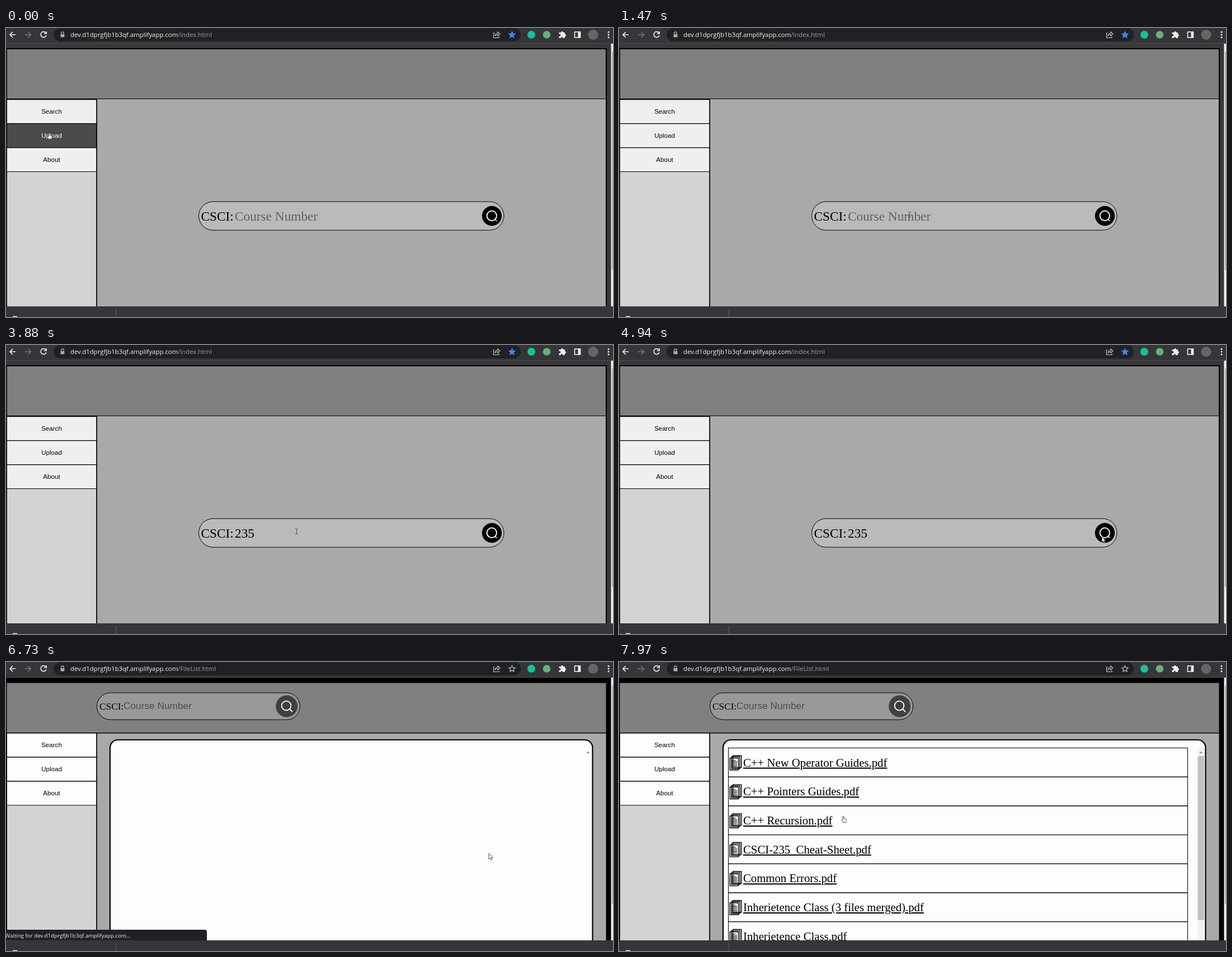
An HTML page for the animation above (8000 ms loop, 1085x516 px).

```html
<!DOCTYPE html>
<html lang="en">
<head>
<meta charset="utf-8">
<title>Course file search</title>
<style>
  html, body { margin: 0; width: 100%; height: 100%; overflow: hidden; background: #35363a; }
  svg { display: block; width: 100%; height: 100%; }
  .ui { font-family: "Open Sans", "Noto Sans", sans-serif; }
  .sans { font-family: "Liberation Sans", Arial, sans-serif; }
  .serif { font-family: "Liberation Serif", "Times New Roman", serif; }
  .line { fill: none; stroke: #f1f1f1; stroke-width: 1.6; }
  text { white-space: pre; }
</style>
</head>
<body>
<svg viewBox="0 0 1085 516">
  <defs>
    <g id="arrow"><path d="M0 0V10L2.3 8L4 11.4L5.6 10.6L4 7.4H7Z" fill="#fff" stroke="#222" stroke-width=".8"/></g>
    <g id="ibeam"><path d="M-2.5-4.5H-.7L0-4L.7-4.5H2.5M0-4V4M-2.5 4.5H-.7L0 4L.7 4.5H2.5" fill="none" stroke="#444" stroke-width=".9"/></g>
    <g id="hand"><path d="M-2 1V-5Q-1-6.4 0-5V-1.5L3-1Q4.4-.6 4.3 1L3.5 5.5H-1.5L-4.4 1.5Q-4-.2-2 1Z" fill="#fff" stroke="#222" stroke-width=".8"/></g>
    <g id="doc" fill="#fff" stroke="#000" stroke-width="1.4">
      <path d="M6 .7H21.3V22H6ZM3.5 2.8H18.7V24H3.5ZM.7 5H16V26.3H.7Z"/>
      <path d="M3 9H11M3 11.6H13.6M3 14.2H13.6M3 16.8H13.6M3 19.4H13.6M3 22H13.6" stroke-width="1.1"/>
    </g>
  </defs>

  <!-- search page -->
  <g id="searchPage">
    <rect y="28" width="1082" height="470" fill="#38383a"/>
    <rect x="1" y="36" width="1073" height="470" fill="#000"/>
    <rect x="2" y="38" width="1070" height="88" fill="#808080"/>
    <rect x="163" y="127" width="909" height="371" fill="#a9a9a9"/>
    <rect x="2" y="127" width="159.5" height="371" fill="#d3d3d3"/>
    <g id="menuA"></g>
    <rect x="344.5" y="310" width="545.5" height="51" rx="25.5" fill="#bababa" stroke="#000"/>
    <g class="serif" font-size="23.3">
      <text x="348.5" y="343.5">CSCI:</text>
      <text id="placeholder" x="409" y="343.5" fill="#616161">Course Number</text>
      <text id="typed" x="409" y="343.5"></text>
    </g>
    <rect id="caret" y="323" width="1.4" height="26"/>
    <circle cx="868.5" cy="335.5" r="17.7"/>
    <path d="M874 341.5L877.3 344.6" class="line" stroke-width="2"/>
    <circle cx="868.3" cy="335.3" r="8.7" class="line" style="stroke-width:2"/>
    <g id="popup">
      <path d="M504 358L510 351L516 358Z" fill="#27292c"/>
      <rect id="popupBox" x="492.5" y="357" width="52" rx="4" fill="#27292c"/>
      <g class="ui" font-size="10.6" fill="#f1f1f1">
        <text x="502.8" y="380.7">235</text>
        <g id="others"><text x="502.8" y="411.5">260</text><text x="502.8" y="442.4">265</text></g>
      </g>
    </g>
  </g>

  <!-- file list page -->
  <g id="listPage">
    <rect y="28" width="1082" height="470"/>
    <rect x="1.5" y="37.5" width="1071" height="88.5" fill="#808080"/>
    <rect x="163" y="127.5" width="909.5" height="371" fill="#a9a9a9"/>
    <rect x="2" y="127.5" width="159.5" height="371" fill="#d3d3d3"/>
    <g id="menuB"></g>
    <rect x="162.5" y="55" width="363" height="48" rx="24" fill="#999" stroke="#000"/>
    <text class="serif" x="167" y="84.5" font-size="17.3">CSCI:</text>
    <text class="sans" x="210" y="84.3" font-size="17.3" fill="#4d4d4d">Course Number</text>
    <circle cx="501.7" cy="79" r="19.5" fill="#404040"/>
    <circle cx="501" cy="78" r="8.3" class="line" style="stroke-width:2"/>
    <path d="M507 84L512 89" class="line" style="stroke-width:2"/>
    <rect x="186" y="139" width="862.5" height="380" rx="14" fill="#fdfdfd" stroke="#000" stroke-width="2.2"/>
    <g id="files">
      <rect x="1034" y="153" width="12.5" height="345" fill="#f1f1f1"/>
      <rect x="1034.5" y="168" width="11.5" height="293" fill="#c1c1c1"/>
    </g>
    <path d="M1037 163L1040.3 159.5L1043.6 163Z" fill="#999"/>
  </g>

  <!-- page scrollbar, browser bars -->
  <rect x="1081.5" y="28" width="4" height="470" fill="#f1f1f1"/>
  <rect x="1083" y="42" width="2" height="390" fill="#b5b5b5"/>
  <g id="status">
    <path d="M0 478H355Q359 478 359 482V498H0Z" fill="#202124"/>
    <text class="ui" x="-2" y="491.6" font-size="9.75" fill="#f1f1f1">Waiting for dev.d1dprgfjb1b3qf.amplifyapp.com...</text>
  </g>
  <rect y="497" width="1085" height="19" fill="#35363a"/>
  <path d="M196.5 502V516" stroke="#5f6064"/>
  <rect x="12" y="514.5" width="8" height="2" fill="#eee"/>
  <rect width="1085" height="28" fill="#35363a"/>
  <path d="M0 27.5H1085" stroke="#4b4c50"/>
  <rect x="85" y="0" width="835" height="24" rx="12" fill="#202124"/>
  <g class="line">
    <path d="M17 12H7M12 7L7 12L12 17"/>
    <path d="M33.5 12H44M39.5 7L44.5 12L39.5 17" stroke="#77787b"/>
    <path id="reload" d="M71.2 8.6A5 5 0 1 0 72 13M72.2 6V10H68"/>
    <path id="stop" d="M62.2 7.2L71.8 16.8M71.8 7.2L62.2 16.8"/>
    <path d="M98.8 11V9.2A2.2 2.2 0 0 1 103.2 9.2V11" stroke="#aaa" stroke-width="1.3"/>
    <path d="M873.5 9H871.5V17.5H881V15M874 14Q874.5 9.5 879 9.5V7L883 10.5L879 14V11.7Q876 11.5 874 14Z" stroke="#c5c6c8" style="stroke-width:1.1"/>
  </g>
  <rect x="97.5" y="11" width="7" height="5.5" rx=".8" fill="#aaa"/>
  <text class="ui" x="115" y="16.2" font-size="11.36" fill="#f4f4f4">dev.d1dprgfjb1b3qf.amplifyapp.com<tspan id="path" fill="#9aa0a6"></tspan></text>
  <path id="star" stroke-width="1.2" stroke-linejoin="round"/>
  <circle cx="939" cy="12" r="7" fill="#15c39a"/>
  <circle cx="966.5" cy="12" r="6.8" fill="#67b279"/>
  <path d="M988.5 8H992A2 2 0 1 1 996 8H999V11A2 2 0 1 1 999 15V18H995.5A2 2 0 1 0 991.5 18H988.5V14.5A2 2 0 1 0 988.5 11Z" fill="#f1f1f1"/>
  <rect x="1016.5" y="7" width="10" height="10" class="line"/>
  <rect x="1022.5" y="7" width="4.5" height="10" fill="#f1f1f1"/>
  <circle cx="1049.5" cy="12" r="9" fill="#666"/>
  <g fill="#f1f1f1"><circle cx="1077" cy="7.3" r="1.5"/><circle cx="1077" cy="12" r="1.5"/><circle cx="1077" cy="16.7" r="1.5"/></g>
  <use id="cursor"/>
</svg>
<script>
const LOOP = 8000;
const $ = id => document.getElementById(id);
const show = (id, on) => $(id).style.display = on ? "" : "none";
// latest entry of a step list [[time, ...values], ...]
const at = (steps, t) => steps.filter(s => s[0] <= t).pop();
const mix = (a, b, k) => Math.round(a + (b - a) * k);
const gray = v => `rgb(${v},${v},${v})`;

function buildMenu(id, top, fill) {
  $(id).innerHTML = ["Search", "Upload", "About"].map((label, i) => {
    const y = top + i * 43;
    return `<rect x="1" y="${y - 1}" width="161" height="44"/>
      <rect class="face" x="2" y="${y + .3}" width="159.5" height="41.7" fill="${fill}"/>
      <text class="sans label" x="81.5" y="${y + 25}" font-size="11.6" text-anchor="middle">${label}</text>`;
  }).join("") + `<rect x="161.5" y="127" width="1.5" height="371"/>`;
}
buildMenu("menuA", 128, "#efefef");
buildMenu("menuB", 127.3, "#fdfdfd");

const names = ["C++ New Operator Guides", "C++ Pointers Guides", "C++ Recursion", "CSCI-235_Cheat-Sheet",
  "Common Errors", "Inherietence Class (3 files merged)", "Inherietence Class"];
$("files").innerHTML += names.map((name, i) => {
  const y = 153.5 + i * 51.7;
  return `<rect x="195.5" y="${y}" width="821" height="51.7" fill="none" stroke="#000"/>
    <use href="#doc" x="197.5" y="${y + 13}"/>
    <text class="serif" x="222" y="${y + 33}" font-size="20.75" text-decoration="underline">${name}.pdf</text>`;
}).join("");

$("star").setAttribute("d", "M" + Array.from({ length: 10 }, (_, i) => {
  const a = i * Math.PI / 5, r = i % 2 ? 2.7 : 6.2;
  return `${904.5 + r * Math.sin(a)} ${12.3 - r * Math.cos(a)}`;
}).join("L") + "Z");

const pointer = [
  [0, "hand", 78, 193], [500, "hand", 83, 177], [640, "hand", 95, 164], [770, "hand", 120, 156],
  [920, "arrow", 207, 203], [1070, "ibeam", 584, 330], [1210, "ibeam", 545, 352], [1340, "ibeam", 524, 338],
  [1470, "ibeam", 519.5, 333], [4030, "arrow", 560, 270], [4160, "arrow", 640, 220], [4290, "arrow", 705, 262],
  [4420, "ibeam", 750, 330], [4570, "ibeam", 812, 345], [4700, "arrow", 852, 355], [4820, "arrow", 861, 351],
  [4940, "arrow", 863, 342], [7270, "arrow", 690, 355], [7410, "arrow", 555, 344], [7540, "arrow", 411, 322],
  [7680, "arrow", 310, 294], [7840, "hand", 375, 287], [7970, "hand", 402, 281]
];
const typing = [[0, ""], [2630, "2"], [2940, "23"], [3340, "235"]];
const caretOn = [[0, 0], [1590, 1], [1970, 0], [2630, 1], [3880, 0], [4420, 1], [4940, 0]];
const popupLook = [[0, 0, 101], [2780, 1, 101], [2940, 1, 37], [3340, .5, 37], [3490, 0, 37]];
const hover = [[0, 0, 1], [640, .5, .5], [770, 1, 0], [920, .5, 0], [1070, 0, 0]];
const statusLook = [[0, 0], [5450, 1], [6870, .66], [6990, .33], [7130, 0]];

const faces = document.querySelectorAll("#menuA .face");
const labels = document.querySelectorAll("#menuA .label");

function draw(t) {
  const loaded = t >= 6730, loading = t >= 5450 && !loaded, moved = t >= 6170;
  show("searchPage", !loaded);
  show("listPage", loaded);
  show("files", t >= 7840);
  show("reload", !loading);
  show("stop", loading);
  $("path").textContent = moved ? "/FileList.html" : "/index.html";
  $("star").setAttribute("fill", moved ? "none" : "#4285f4");
  $("star").setAttribute("stroke", moved ? "#c5c6c8" : "#4285f4");
  $("status").style.opacity = at(statusLook, t)[1];

  at(hover, t).slice(1).forEach((k, i) => {
    faces[i].setAttribute("fill", gray(mix(239, 75, k)));
    labels[i].setAttribute("fill", gray(mix(0, 255, k)));
  });

  const text = at(typing, t)[1];
  $("typed").textContent = text;
  show("placeholder", !text);
  show("caret", at(caretOn, t)[1]);
  $("caret").setAttribute("x", 408.5 + text.length * 11.65);

  const [, opacity, height] = at(popupLook, t);
  $("popup").style.opacity = opacity;
  $("popupBox").setAttribute("height", height);
  show("others", height > 50);

  const [, shape, x, y] = at(pointer, t);
  $("cursor").setAttribute("href", "#" + shape);
  $("cursor").setAttribute("transform", `translate(${x} ${y})`);
}

function frame() {
  draw(performance.now() % LOOP);
  requestAnimationFrame(frame);
}
frame();
</script>
</body>
</html>
```
